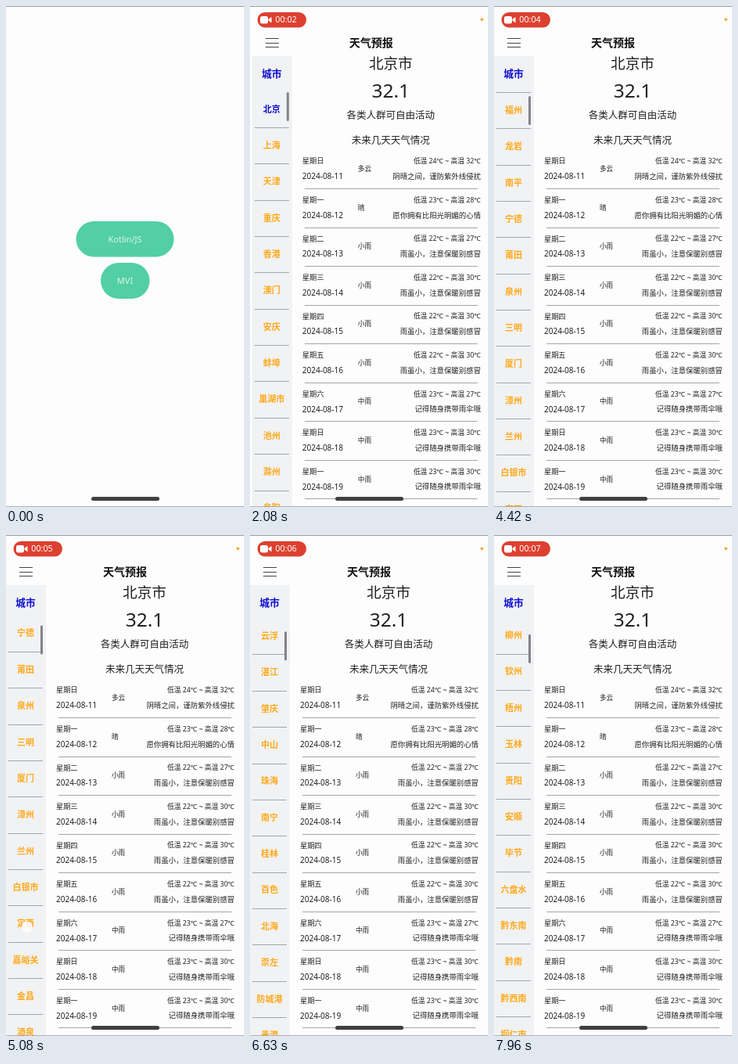
An HTML page with a canvas that plays this animation: 304 px wide and 640 px high, repeating every 8 s.

```html
<!DOCTYPE html>
<html lang="zh-CN">
<head>
<meta charset="utf-8">
<title>天气预报</title>
<style>
html, body { margin: 0; width: 304px; height: 640px; overflow: hidden; background: #fdfdfd; }
canvas { display: block; }
</style>
</head>
<body>
<canvas id="stage" width="304" height="640"></canvas>
<script>
const LOOP = 8000, W = 304, H = 640, PITCH = 46.35, LIST_TOP = 109;
const PAGE = '#fdfdfd', SIDE = '#f1f2f4', INK = '#202020', RULE = '#a4a4b0';
const FONT = '"Noto Sans", "Noto Sans CJK SC", "Noto Sans CJK", sans-serif';
const c = document.getElementById('stage').getContext('2d');

const cities = ('北京 上海 天津 重庆 香港 澳门 安庆 蚌埠 巢湖市 池州 滁州 阜阳 淮北 淮南 黄山市 六安 马鞍山 宿州 铜陵 芜湖市 宣城 亳州 ' +
  '福州 龙岩 南平 宁德 莆田 泉州 三明 厦门 漳州 兰州 白银市 定西 嘉峪关 金昌 酒泉 临夏 陇南 平凉 庆阳 天水 武威 张掖 ' +
  '广州 潮州 东莞 佛山 河源 惠州 江门 揭阳 茂名 梅州 清远 汕头 汕尾 韶关 深圳 阳江 云浮 湛江 肇庆 中山 珠海 ' +
  '南宁 桂林 百色 北海 崇左 防城港 贵港 河池 贺州 来宾 柳州 钦州 梧州 玉林 ' +
  '贵阳 安顺 毕节 六盘水 黔东南 黔南 黔西南 铜仁市 遵义市').split(' ');

const notes = {
  多云: '阴晴之间，谨防紫外线侵扰',
  晴: '愿你拥有比阳光明媚的心情',
  小雨: '雨虽小，注意保暖别感冒',
  中雨: '记得随身携带雨伞哦'
};
// sky, low, high
const days = [
  ['多云', 24, 32], ['晴', 23, 28], ['小雨', 22, 27], ['小雨', 22, 30], ['小雨', 22, 30],
  ['小雨', 22, 30], ['中雨', 23, 27], ['中雨', 23, 30], ['中雨', 23, 30]
];

// Each swipe: start time and the distance it coasts
const flings = [[3469, 1221], [5080, 1193], [6347, 1295]];
const FRICTION = 530;
const ticks = [1040, 2040, 2920, 4040, 5040, 6040, 7040];

const clamp = v => Math.max(0, Math.min(1, v));

function scrollAt(t) {
  let pos = 0;
  flings.forEach(([start, dist], i) => {
    const end = i + 1 < flings.length ? flings[i + 1][0] : LOOP;
    const dt = Math.min(t, end) - start;
    if (dt > 0) pos += dist * (1 - Math.exp(-dt / FRICTION));
  });
  return pos;
}

// Text centred vertically on y
function text(str, x, y, size, color = INK, align = 'center', weight = 400) {
  c.font = `${weight} ${size}px ${FONT}`;
  c.textAlign = align;
  c.fillStyle = color;
  c.fillText(str, x, y + size * 0.37);
}

function rect(x, y, w, h, color) {
  c.fillStyle = color;
  c.fillRect(x, y, w, h);
}

function pill(x, y, w, h, color, r = Math.min(w, h) / 2) {
  c.fillStyle = color;
  c.beginPath();
  c.roundRect(x, y, w, h, r);
  c.fill();
}

function drawHome() {
  rect(0, 0, W, H, PAGE);
  pill(89.5, 275, 125, 45.5, '#52cfa4');
  pill(121, 328, 62.5, 46, '#52cfa4');
  text('Kotlin/JS', 152, 297.5, 11, '#d8f5e4');
  text('MVI', 152, 351, 11, '#d8f5e4');
}

function drawCities(t) {
  const pos = scrollAt(t);
  rect(0, 64, 51, H - 64, SIDE);
  text('城市', 25, 86, 12.8, '#1010d0', 'center', 700);
  c.save();
  c.beginPath();
  c.rect(0, LIST_TOP, 51, H - LIST_TOP);
  c.clip();
  cities.forEach((name, i) => {
    const y = 131.5 + i * PITCH - pos;
    if (y < 60 || y > H + 20) return;
    text(name, 25, y, 11, i ? '#ffa818' : '#1010d0', 'center', 700);
    rect(3, Math.round(y + 23.5), 44, 1, RULE);
  });
  c.restore();
  pill(44, LIST_TOP + 1 + pos * 0.0048, 3, 37, '#828288');

  const swipe = flings.find(([start]) => Math.abs(t - start) < 90);
  if (swipe) {
    const y = 503 - (pos - scrollAt(swipe[0]));
    pill(20, y - 7, 14, 14, 'rgba(253,253,253,.85)');
  }
}

function drawWeather(t) {
  rect(0, 0, W, H, PAGE);
  for (const y of [41, 47, 52]) rect(17, y, 17, 1, '#444');
  text('天气预报', 152, 46.5, 14, '#111', 'center', 700);
  text('北京市', 177, 73.5, 18.6);
  text('32.1', 177, 108, 24.4);
  text('各类人群可自由活动', 177, 139, 12.5);
  text('未来几天天气情况', 177, 171.5, 12.5);
  days.forEach(([sky, low, high], i) => {
    const y = 198 + i * 49.55;
    text('星期' + '日一二三四五六'[i % 7], 64, y, 9.2, INK, 'left');
    text('2024-08-' + (11 + i), 64, y + 19.5, 10, INK, 'left');
    text(sky, 135, y + 10, 8.6, INK, 'left');
    text(`低温 ${low}℃ ~ 高温 ${high}℃`, 292, y, 8.7, INK, 'right');
    text(notes[sky], 292, y + 19.5, 9.4, INK, 'right');
    rect(67, Math.round(y + 35), 221, 1, RULE);
  });
  drawCities(t);
}

function drawRecorder(t) {
  const k = clamp((t - 500) / 500);
  if (!k) return;
  const grow = 1 - (1 - k) ** 3;
  c.save();
  c.globalAlpha = clamp(k * 3);
  pill(9.5, 8, 20 + 42.5 * grow, 19.5, '#dd4030');
  pill(13, 13, 10, 9.5, '#fff', 2.5);
  c.beginPath();
  c.moveTo(23.5, 17);
  c.lineTo(27.5, 14);
  c.lineTo(27.5, 21.5);
  c.lineTo(23.5, 18.5);
  c.fill();
  c.globalAlpha = clamp(k * 3 - 2);
  text('00:0' + ticks.filter(v => t >= v).length, 46, 17.5, 10.8, '#fff');
  pill(294.5, 15.5, 3.5, 3.5, '#f0a020');
  c.restore();
}

function draw(t) {
  const u = Math.max(0, t - 1520) * 0.012;
  const away = (1 + u) * Math.exp(-u);
  const at = (x, paint) => {
    c.save();
    c.translate(x, 0);
    paint(t);
    c.restore();
  };
  rect(0, 0, W, H, PAGE);
  if (away > 0.001) at(-60 * (1 - away), drawHome);
  if (u > 0) at(W * away, drawWeather);
  drawRecorder(t);
  pill(109, 627, 87, 5, '#404040');
  rect(0, 0, W, 1, '#a0a0a0');
  rect(0, H - 1, W, 1, '#b0b0b0');
}

function frame() {
  draw(performance.now() % LOOP);
  requestAnimationFrame(frame);
}
frame();
</script>
</body>
</html>
```
